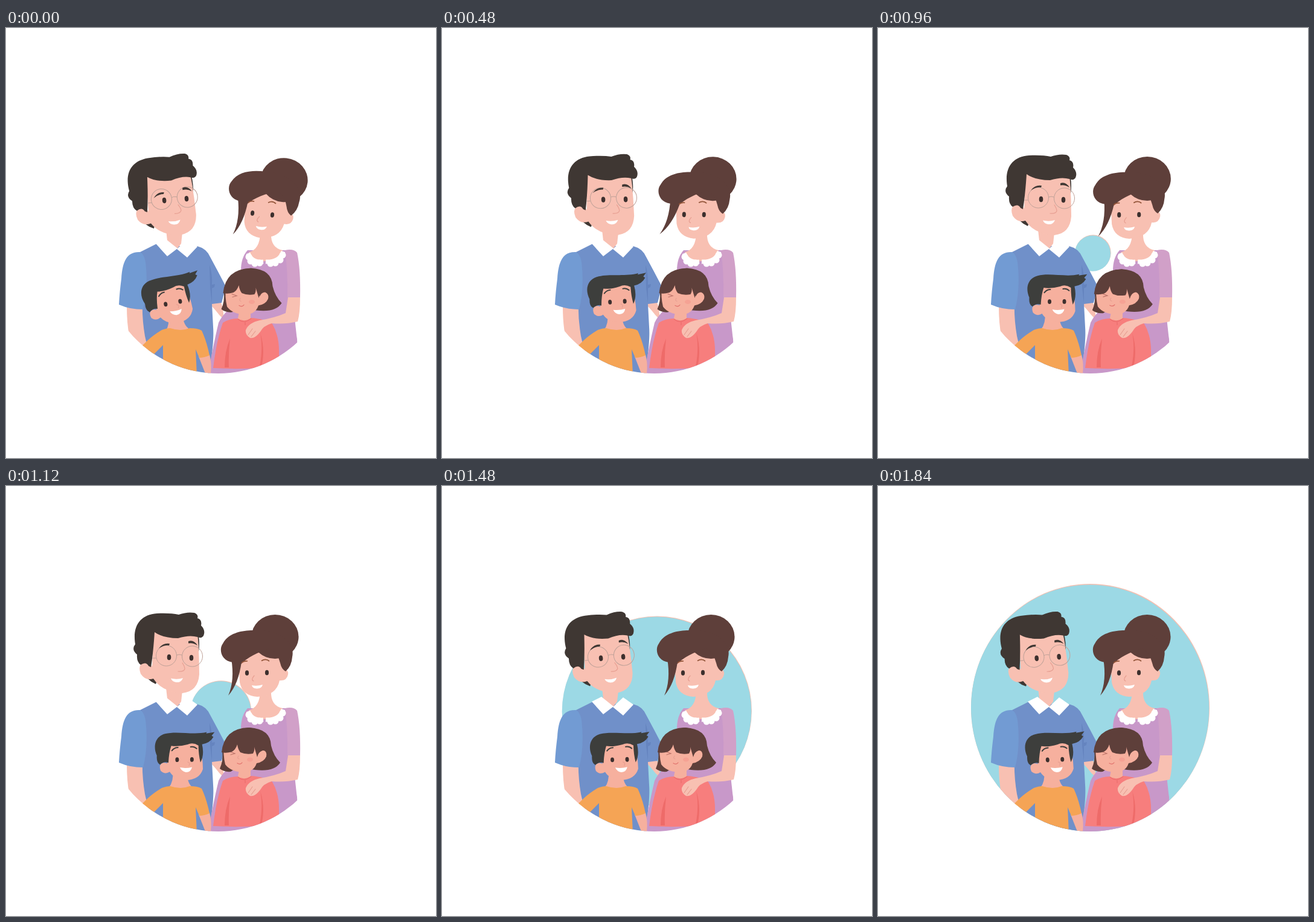
An HTML page for the animation above (1880 ms loop, 712 px wide and 712 px high).

```html
<!DOCTYPE html>
<html lang="en">
<head>
<meta charset="utf-8">
<title>Family portrait</title>
<style>
  html, body { margin: 0; width: 100%; height: 100%; overflow: hidden; background: #fff; }
  svg { display: block; width: 100vw; height: 100vh; }
  .skin { fill: #f8c0b2; }
  .kid { fill: #f6b09e; }
  .dadHair { fill: #3f3733; }
  .momHair { fill: #5e3f3a; }
  .sonHair { fill: #3d3e3c; }
  .white { fill: #fff; }
  .eye { fill: #3d302e; }
  .line { fill: none; stroke: #e79f92; stroke-width: 1.2; stroke-linecap: round; }
</style>
</head>
<body>
<svg viewBox="0 0 712 712">
  <defs>
    <clipPath id="frame"><ellipse cx="351.5" cy="367" rx="197.5" ry="205"/></clipPath>
    <clipPath id="inner"><ellipse cx="350.8" cy="368.4" rx="197.5" ry="205"/></clipPath>
  </defs>

  <g clip-path="url(#frame)">
    <circle id="rim" cx="356.1" cy="372.2" fill="#f5bfb0"/>
    <g clip-path="url(#inner)"><circle id="disc" cx="355.5" cy="373.2" fill="#9cd9e5"/></g>

    <!-- father: body -->
    <path class="skin" d="M200 460Q200 495 206 518L240 545L262 500L229 490L227 460Z"/>
    <path class="skin" d="M340 452L355 452Q361 465 360 482L353 475Q346 466 341 461Z"/>
    <path fill="#7090c9" d="M222 371L250 357L283 361L316 361Q332 365 338 379Q351 403 364 428L357 455L341 457L343 495Q345 520 336 575H245L230 510Q225 480 226 455Z"/>
    <path fill="#6584bf" d="M337 392Q342 408 341 425L346 424L345 429L341 431L341 456L338 430Z"/>
    <path fill="#729bd3" d="M222 371C200 370 193 386 191 415Q188 438 187 458Q205 466 227 466Q236 430 231 388Q229 375 222 371Z"/>
    <path class="skin" d="M264 325L293 330L290 357L283 366L267 352Z"/>
    <path class="white" d="M248 357L264 349L284 365L267 378ZM283 366L300 350L317 362L300 380Z"/>

    <!-- mother: body -->
    <path fill="#c898c9" d="M400 368Q389 380 389 402V450Q360 470 352 488Q342 530 334 575H484L482 515Q478 490 478 465L470 368Z"/>
    <path fill="#d1a0c8" d="M462 368Q476 365 482 372Q488 400 487 446H466Q467 405 462 368Z"/>
    <path class="skin" d="M402 371Q420 367 421 340H439Q438 364 458 368Q452 392 429 386Q411 390 402 371Z"/>
    <path fill="none" stroke="#fff" stroke-width="7" d="M401 373Q407 389 426 387M430 387Q453 388 459 370"/>
    <g id="scallops" class="white"></g>

    <!-- father: head -->
    <g id="dad">
      <path class="dadHair" d="M226 305Q233 322 248 328L254 312Z"/>
      <path class="skin" d="M244 240H317Q320 275 320 312Q318 340 292 343Q258 341 244 319Q231 323 223 311Q217 295 230 291Q238 291 242 299Z"/>
      <path class="dadHair" d="M317 246L319 248Q321 262 319 274Q319 260 317 246Z"/>
      <path class="dadHair" d="M236 298Q232 290 223 296Q216 291 217 279Q207 271 214 262C209 232 222 213 250 211Q272 210 286 213Q300 208 312 210Q319 213 317 219Q325 221 323 231Q331 239 327 248Q324 253 317 250Q304 246 285 252Q260 252 246 242Q244 275 240 300Z"/>
      <g fill="none" stroke="#bfa198" stroke-width="1">
        <circle cx="265.5" cy="281" r="17"/><circle cx="308.5" cy="282" r="17"/>
        <path d="M282.5 280Q287 278 291.5 280M248.5 285L242 285"/>
      </g>
      <g class="eye"><ellipse cx="270" cy="283.5" rx="3.3" ry="4.7"/><ellipse cx="307" cy="284.5" rx="3.3" ry="4.7"/></g>
      <path id="dadBrows" class="dadHair" d="M253 269Q260 259 271 261L270 264Q262 263 253 269ZM302 257Q311 254 317 264Q310 259 302 260.5Z"/>
      <path class="line" d="M292 293Q296 299 296 303Q294 308 285 307"/>
      <path class="white" d="M273 318.5Q283 321 293 318Q290 326 282 325Q275 324 273 318.5Z"/>
    </g>

    <!-- mother: head -->
    <g id="mom">
      <path class="skin" d="M385 290L430 262L456 266L460 304Q468 303 467 312Q465 323 453 322Q448 347 416 349Q391 347 387 325Z"/>
      <path id="tendril" class="momHair" d="M373 286Q379 322 368 347Q385 328 390 291Z"/>
      <ellipse class="momHair" cx="445.5" cy="249.5" rx="39" ry="36.5"/>
      <path class="momHair" d="M376 292C356 290 352 270 359 261C368 243 392 238 414 239C445 236 480 255 474 283Q473 298 463 307Q456 303 454 293Q450 276 437 269C418 275 400 283 387 297Z"/>
      <g class="eye"><ellipse cx="399" cy="309.5" rx="3.1" ry="4.3"/><ellipse cx="432" cy="309" rx="3.1" ry="4.3"/></g>
      <path fill="none" stroke="#925438" stroke-width="1.7" d="M390 293Q394 289 400 290M423 289.5Q430 285 436 290"/>
      <path class="line" d="M411 314Q405 321 410 323"/>
      <path class="white" d="M407 330Q415 332 425 329Q423 336 415 335.5Q408 335 407 330Z"/>
    </g>

    <!-- son -->
    <path id="sonNeck" class="kid" d="M277 470H301Q299 490 308 498L300 508H280L270 499Q278 490 277 470Z"/>
    <path class="kid" d="M319 544L337 541Q341 555 339 572H330Z"/>
    <path fill="#f5a455" d="M258 500Q266 497 272 497Q290 503 304 497Q318 497 324 501Q332 518 337 542Q328 546 320 546L314 532L316 575H260L260 525L242 543L222 530Q240 510 258 500Z"/>
    <g id="son">
      <path class="kid" d="M268 425H322Q327 450 327 469Q321 487 298 487Q280 486 272 473Q264 478 257 471Q253 460 262 458Q268 458 268 460Z"/>
      <path class="sonHair" d="M255 460Q250 457 251 446C244 430 249 414 265 410C285 405 312 413 334 408L333 410L347 408L342 414L345 416Q339 426 326 428Q330 446 323 458Q320 445 320 430Q311 424 302 428Q287 432 275 430Q271 441 270 458Q263 455 256 461Z"/>
      <g class="eye"><ellipse cx="284.5" cy="453" rx="3" ry="3.9"/><ellipse cx="309" cy="453" rx="3" ry="3.9"/></g>
      <path fill="none" stroke="#3d3e3c" stroke-width="2" stroke-linecap="round" d="M276 438Q280 433 286 433M307 432Q313 431 317 435"/>
      <path class="line" d="M302 457Q307 459 304 463"/>
      <path class="white" d="M289 466Q299 468 309 465.5Q307 474 299 474Q292 473 289 466Z"/>
    </g>

    <!-- daughter -->
    <path class="kid" d="M387 465H405V486H383Z"/>
    <path fill="#f77e7d" d="M384 481Q394 488 406 480Q430 482 441 490Q453 510 452 540L453 557Q415 567 343 563Q348 520 359 488Q370 481 384 481Z"/>
    <path fill="#ee6b69" d="M371 514Q362 535 362 562H369Q368 540 371 514ZM421 505Q429 530 424 557L420 560Q426 530 421 505Z"/>
    <path fill="none" stroke="#e86a68" stroke-width="1" d="M384 482Q394 491 406 481M396 487V492"/>
    <path id="girlBack" class="momHair" d="M403 400Q438 402 439 430Q443 447 454 458Q444 474 412 470L385 465L372 473Q361 474 354 468Q360 455 358 438Q363 403 403 400Z"/>
    <g id="girlFace">
      <path class="kid" d="M361 425L414 422L417 444Q420 437 426 437Q433 440 431 448Q427 457 415 459Q410 474 392 474Q372 473 363 461Q359 445 361 425Z"/>
      <path class="line" style="stroke:#bd746a" d="M371 440L379 443L372 445"/>
      <path class="line" style="stroke:#e06f6a" d="M383 459Q388 462 391 458"/>
      <path class="line" d="M385 447Q382 451 386 452"/>
      <ellipse cx="404" cy="453" rx="5" ry="3.5" fill="#f5a294"/>
    </g>
    <path id="girlFringe" class="momHair" d="M357 441Q361 401 402 400Q437 403 439 440L432 444Q431 437 425 438Q418 440 416 449L411 432Q412 438 409 443Q397 445 388 441Q384 436 383 428Q380 437 374 440Q365 443 357 441Z"/>

    <!-- mother: forearm and hand -->
    <path class="skin" d="M467 446H487Q487 472 483 486Q462 491 440 489Q426 493 421 503Q412 515 404 513Q396 508 397 500Q402 488 420 484Q445 480 463 472Z"/>
    <path class="line" d="M401 508L408 498M406 511L413 502"/>
  </g>
</svg>
<script>
  const LOOP = 1880, STEP = 40;
  const el = id => document.getElementById(id);

  // Monotone cubic curve through [time, value] pairs.
  function curve(...keys) {
    const last = keys.length - 1;
    const slope = i => (keys[i + 1][1] - keys[i][1]) / (keys[i + 1][0] - keys[i][0]);
    const tangent = i => {
      if (i === 0) return slope(0);
      if (i === last) return 0;
      const a = slope(i - 1), b = slope(i);
      return a * b <= 0 ? 0 : 2 * a * b / (a + b);
    };
    return t => {
      if (t <= keys[0][0]) return keys[0][1];
      if (t >= keys[last][0]) return keys[last][1];
      const i = keys.findIndex(k => k[0] > t) - 1;
      const [t0, v0] = keys[i], [t1, v1] = keys[i + 1];
      const d = t1 - t0, u = (t - t0) / d, w = 1 - u;
      return v0 * (1 + 2 * u) * w * w + v1 * (3 - 2 * u) * u * u
        + d * u * w * (w * tangent(i) - u * tangent(i + 1));
    };
  }

  const motion = {
    dad: curve([0, -6], [480, -2.2], [760, 0], [1120, 0], [1320, -4.6], [1600, -5.4], [1840, -5.5]),
    brows: curve([0, 9], [480, 3], [760, 0]),
    mom: curve([0, 6], [480, 1.2], [760, 0.5], [1120, 0]),
    tendril: curve([0, -3], [480, 11], [760, 11], [1120, 0]),
    son: curve([0, -11], [480, -3.4], [760, 0], [1120, -0.6], [1320, -1.1], [1600, -1.5], [1840, -2]),
    girl: curve([760, 1], [1120, 0]),
    radius: curve([680, 0], [760, 9.5], [1120, 50], [1320, 110], [1600, 186.5], [1680, 199.5], [1800, 214])
  };

  const turn = (id, angle, x, y) => el(id).setAttribute('transform', `rotate(${angle} ${x} ${y})`);
  const shift = (id, x, y) => el(id).setAttribute('transform', `translate(${x} ${y})`);

  el('scallops').innerHTML = [[402, 379], [405, 386], [412, 390], [420, 389], [438, 390], [446, 389], [454, 384], [458, 376]]
    .map(([x, y]) => `<circle cx="${x}" cy="${y}" r="5.5"/>`).join('');

  function draw(t) {
    turn('dad', motion.dad(t), 285, 360);
    shift('dadBrows', 0, motion.brows(t));
    turn('mom', motion.mom(t), 432, 395);
    turn('tendril', motion.tendril(t), 385, 300);
    turn('son', motion.son(t), 297, 560);
    turn('sonNeck', motion.son(t) / 2, 297, 560);
    const g = motion.girl(t);
    shift('girlBack', 2.5 * g, -2.5 * g);
    shift('girlFringe', 2.5 * g, -2 * g);
    shift('girlFace', 3 * g, 0.5 * g);
    const r = motion.radius(t);
    el('disc').setAttribute('r', r);
    el('rim').setAttribute('r', r);
  }

  const start = performance.now();
  function tick() {
    const t = (performance.now() - start) % LOOP;
    draw(Math.floor(t / STEP) * STEP);
    requestAnimationFrame(tick);
  }
  tick();
</script>
</body>
</html>
```
